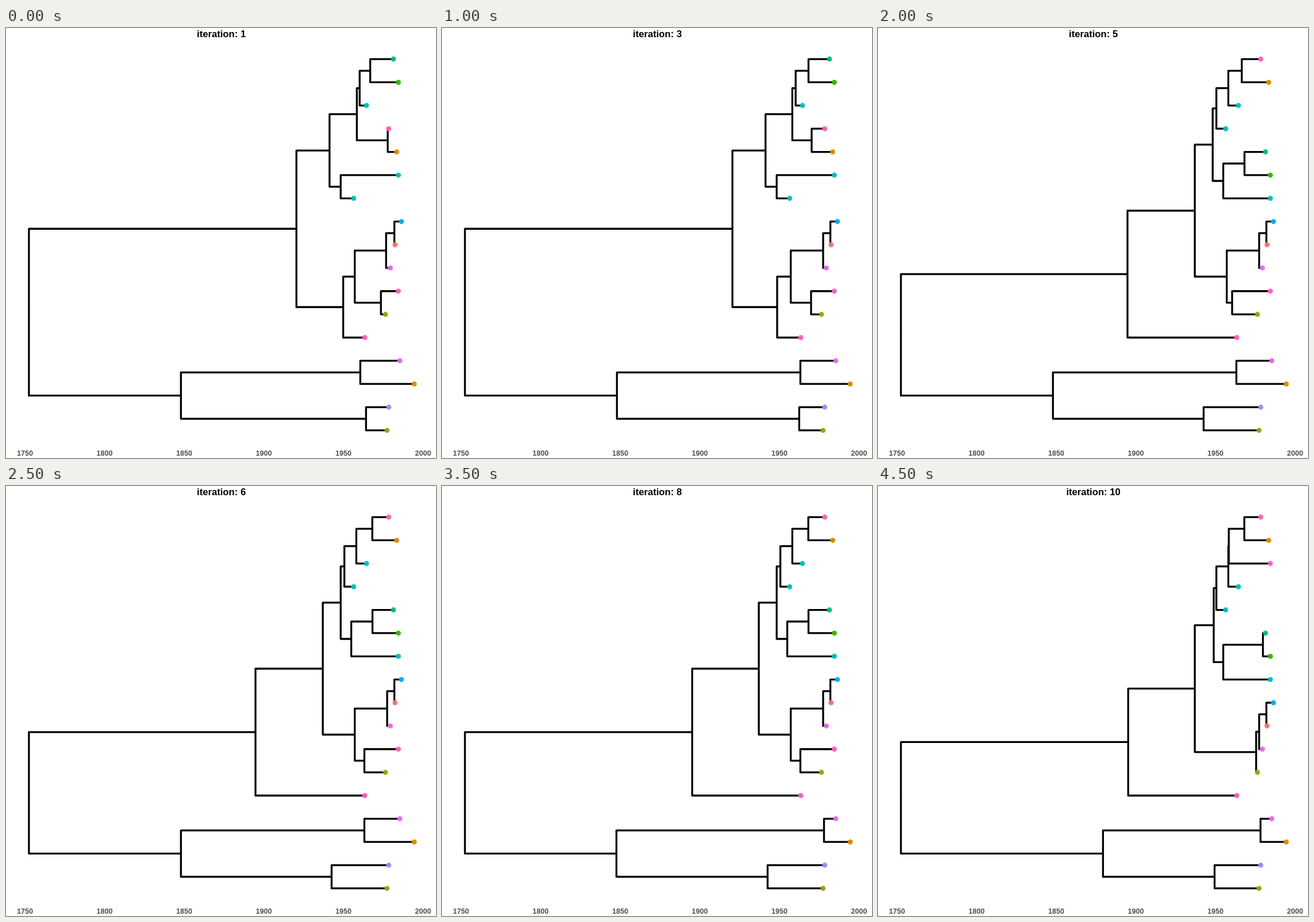
Recreate the animation shown at these times as an HTML page. Size 748 px wide and 748 px high, loop 5 s.

```html
<!DOCTYPE html>
<html lang="en">
<head>
<meta charset="utf-8">
<title>Tree iterations</title>
<style>
  html, body { margin: 0; width: 100%; height: 100%; overflow: hidden; background: #fff; }
  svg { display: block; width: 100%; height: 100%; }
  text { font-family: "Liberation Sans", Arial, sans-serif; font-weight: bold; text-anchor: middle; }
  #title { font-size: 16.67px; }
  #axis { font-size: 12.5px; fill: #4d4d4d; }
  #branches { fill: none; stroke: #000; stroke-width: 3.3; stroke-linecap: round; }
</style>
</head>
<body>
<svg viewBox="0 0 748 748">
  <rect width="748" height="748" fill="#fff"/>
  <path id="branches"/>
  <g id="tips" fill-opacity=".94"></g>
  <g id="axis"></g>
  <text id="title" x="374.6" y="16"></text>
</svg>
<script>
const STEP = 500;
const $ = id => document.getElementById(id);

const RED = '#F8766D', ORANGE = '#D89000', OLIVE = '#A3A500', GREEN = '#39B600', TEAL = '#00BF7D',
      CYAN = '#00BFC4', BLUE = '#00B0F6', VIOLET = '#9590FF', MAGENTA = '#E76BF3', PINK = '#FF62BC';

// Tips: x position and colour.
const tips = {
  a: [674, TEAL], b: [682.5, GREEN], c: [627, CYAN], d: [665.8, PINK], e: [679.7, ORANGE],
  f: [682.5, CYAN], g: [604.8, CYAN], h: [687.9, BLUE], i: [676.8, RED], j: [668.6, MAGENTA],
  k: [682.5, PINK], l: [660.1, OLIVE], m: [624.2, PINK], n: [685.1, MAGENTA], o: [710.2, ORANGE],
  p: [665.8, VIOLET], q: [662.9, OLIVE]
};

// Each iteration moves some inner nodes and may rearrange the tree.
const lower = '((n,o)M,(p,q)N)O)P';
const steps = [
  { tree: '((((((a,b)A,c)B,(d,e)C)D,(f,g)E)F,((((h,i)G,j)H,(k,l)I)J,m)K)L,' + lower,
    A: 633.6, B: 615.2, C: 664, D: 610.3, E: 582.2, F: 562.8, G: 675.6, H: 661.2,
    I: 652.2, J: 606.7, K: 586.6, L: 505.2, M: 616.3, N: 626.3, O: 304.3, P: 39.9 },
  { A: 637.5, I: 642, K: 583, M: 623.4, N: 621.4 },
  { C: 643, D: 609.4, H: 663 },
  { tree: '(((((((a,b)A,c)B,(d,e)C)D,g)F,f)E,((((h,i)G,j)H,(k,l)I)J,m)K)L,' + lower,
    C: 632.8, F: 588.6, L: 529.5, N: 566.4 },
  { tree: '(((((((d,e)C,c)D,g)F,((a,b)A,f)B)E,(((h,i)G,j)H,(k,l)I)J)L,m)K,' + lower,
    B: 600.6, I: 616, K: 434, L: 551.1 },
  { C: 637.2, I: 623.4 },
  { M: 664.5, O: 303.4 },
  { K: 435.2 },
  { E: 584, J: 619.2, M: 665.4, O: 391.4 },
  { tree: '((((((((d,e)C,k)I,c)D,g)F,((a,b)A,f)B)E,(((h,i)G,j)H,l)J)L,m)K,' + lower,
    A: 669.6, I: 610.2, J: 657.8, N: 585.5 }
];

function layout(state) {
  const stack = [];
  let path = '', dots = '', row = 0;
  for (const [name] of state.tree.matchAll(/\w/g)) {
    if (tips[name]) {
      const [x, color] = tips[name], y = 54.1 + 40.365 * row++;
      dots += `<circle cx="${x}" cy="${y}" r="4.5" fill="${color}"/>`;
      stack.push({ x, y });
    } else {
      const [top, bottom] = stack.splice(-2), x = state[name];
      path += `M${x} ${top.y}V${bottom.y}`;
      for (const kid of [top, bottom]) path += `M${x} ${kid.y}H${kid.x}`;
      stack.push({ x, y: (top.y + bottom.y) / 2 });
    }
  }
  const root = stack[0];
  path += `M${root.x} ${root.y}h.2`;
  return { path, dots };
}

let state = {};
const views = steps.map(s => layout(state = { ...state, ...s }));

for (let year = 1750; year <= 2000; year += 50) {
  const x = 33 + (year - 1750) * 2.77;
  $('axis').innerHTML += `<text x="${x}" y="744">${year}</text>`;
}

let shown = -1;
function draw(time) {
  const n = Math.floor(time / STEP) % views.length;
  if (n !== shown) {
    shown = n;
    $('branches').setAttribute('d', views[n].path);
    $('tips').innerHTML = views[n].dots;
    $('title').textContent = `iteration: ${n + 1}`;
  }
}

const start = performance.now();
function tick() {
  draw(performance.now() - start);
  requestAnimationFrame(tick);
}
tick();
</script>
</body>
</html>
```
